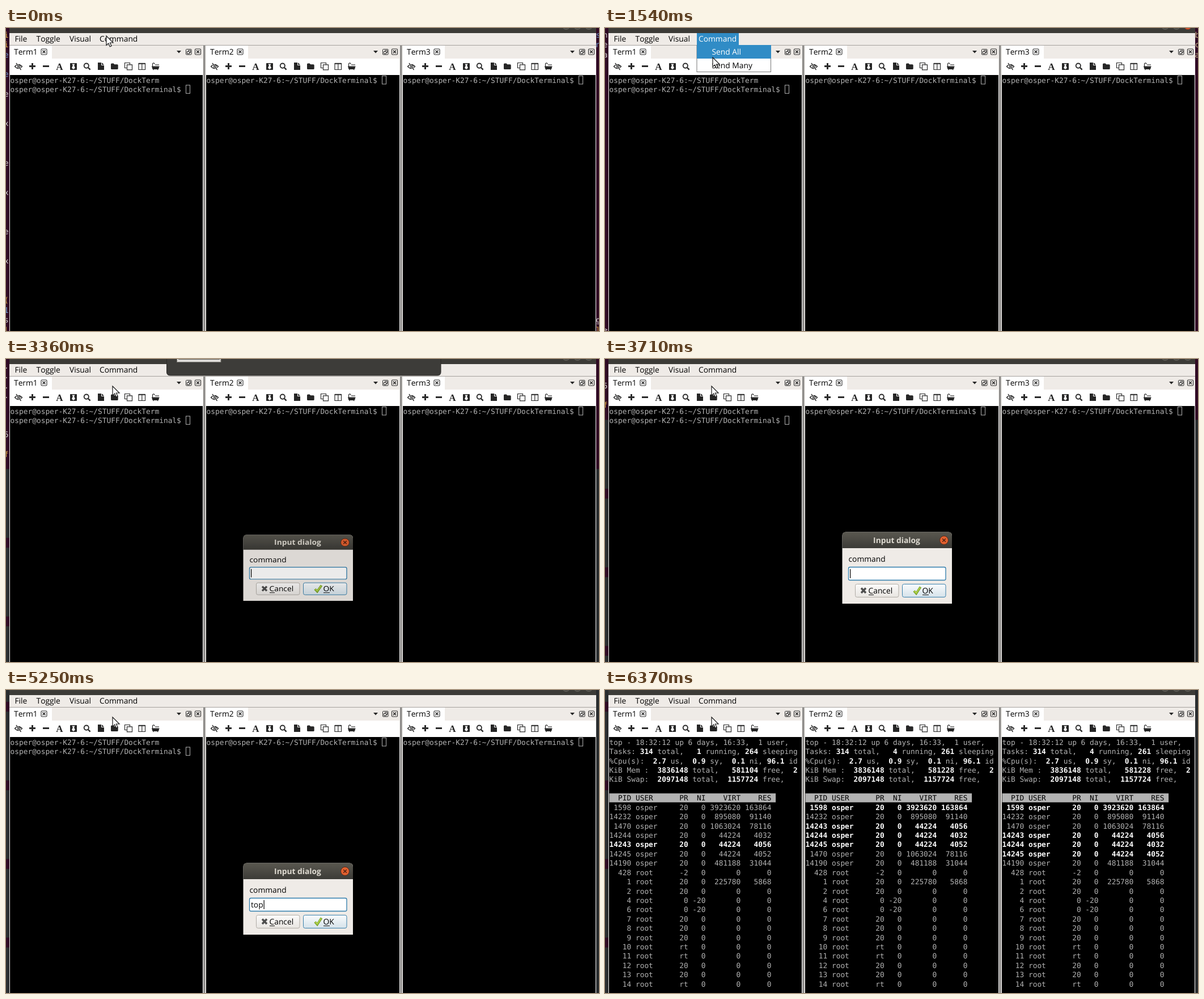
Recreate the animation shown at these times as an HTML page. Size 1046 by 535 pixels, loop 8000 ms.

```html
<!DOCTYPE html>
<html lang="en">
<head>
<meta charset="utf-8">
<title>Dock terminal</title>
<style>
  html, body { margin: 0; width: 100%; height: 100%; overflow: hidden; background: #000; }
  svg { display: block; }
  text { white-space: pre; text-rendering: geometricPrecision; }
  .ui { font: 13.8px "Open Sans", "Noto Sans", sans-serif; font-kerning: none; fill: #000; }
  .mono { font: 12.83px "DejaVu Sans Mono", monospace; fill: #b2b2b2; }
  .mono .b { font-weight: bold; fill: #fff; }
  .side { font: 13.6px "DejaVu Sans Mono", monospace; }
  .line { fill: none; stroke: #2b2b2b; }
</style>
</head>
<body>
<svg id="stage" width="1046" height="535" viewBox="0 0 1046 535"></svg>
<script>
const LOOP = 8000, STEP = 70, LINE = 17.35;
const USER = 'osper', HOST = 'osper-K27-6';
const COL = 7.724, ROW = 16.42;
const PANEL = '#efebe7', ACCENT = '#308cc6';
const docks = [7, 353, 700];

const rect = (x, y, w, h, fill, more = '') =>
  `<rect x="${x}" y="${y}" width="${w}" height="${h}" fill="${fill}" ${more}/>`;
const path = (d, more = '') => `<path d="${d}" ${more}/>`;
const text = (x, y, s, cls = 'ui', more = '') =>
  `<text x="${x}" y="${y}" class="${cls}" ${more}>${s}</text>`;
const group = (id, body) => `<g id="${id}">${body}</g>`;
const rowY = i => 96.8 + i * ROW;

// Text peeking out beside the window: [line, glyphs, colour]
const WHITE = '#d0cfcc', BLUE = '#6d97cb', GOLD = '#d9a441';
const leftText = [
  [0, 'ii', GOLD], [2, 'e e', BLUE], [6, 'e', WHITE], [9, 'x', WHITE], [13, 'e', WHITE],
  [16, 'x', WHITE], [20, 'e', WHITE], [23, 'x', WHITE], [27, '(', GOLD], [28, '1', BLUE],
  [29, 's', WHITE], [30, 'lili', GOLD], [34, 'c', WHITE], [37, 'nenea', WHITE],
  [69, '&gt;', WHITE], [71, '.....', WHITE], [79, '5', WHITE], [81, 'f', GOLD]
];
const rightText = [
  [0, 'sn', BLUE], [29, 'g', WHITE], [30, 'l', GOLD], [32, '-l', GOLD],
  [36, 'nfbbca', '#c9b48a']
];

function sideText(list, x) {
  return list.map(([line, s, colour]) =>
    s.match(/&gt;|./g).map((c, i) =>
      text(x, 17 + (line + i) * LINE, c, 'side', `fill="${colour}"`)).join('')).join('');
}

function backdrop() {
  const end = 12 + 82.5 * LINE;
  let s = rect(0, -600, 1046, end + 600, '#300a24');
  for (let n = 90; n < 124; n += 8) s += rect(0, 3.5 + n * LINE, 6, LINE, '#300a24');
  return s + sideText(leftText, -3.4) + sideText(rightText, 1040.6);
}

function closeBox(x, y) {
  return rect(x - 5, y - 5, 10, 10, 'none', 'class="line" rx="1.5" stroke-width="1.1"') +
    path(`M${x - 2.5} ${y - 2.5}l5 5m0-5l-5 5`, 'class="line" stroke-width="1.6"');
}

function icons() {
  const dark = 'fill="#262626"';
  return path('M-6.5 0Q0-7 6.5 0Q0 7-6.5 0Z', 'class="line" stroke-width="1.3" transform="translate(22 68)"') +
    `<circle cx="22.5" cy="67.5" r="2.3" class="line" stroke-width="1.4"/>` +
    path('M18 62l8.5 12', 'stroke="#fff" stroke-width="3"') +
    path('M18 62l8.5 12', 'class="line" stroke-width="1.4"') +
    path('M41 67.5h11M46.5 62v11M65 67.5h11', 'class="line" stroke-width="3"') +
    `<text x="94.5" y="73.6" text-anchor="middle" font-family="Liberation Serif, serif" font-weight="bold" font-size="17" ${dark}>A</text>` +
    rect(113, 62, 12, 12, '#262626', 'rx=".8"') +
    path('M116.5 63.5h5l-1.4 2.5 1.8 4.5-2.9 2.5-2.9-2.5 1.8-4.5z', 'fill="#fff"') +
    `<circle cx="141.8" cy="66.6" r="4.1" class="line" stroke-width="1.9"/>` +
    path('M145 70l3.6 3.7', 'class="line" stroke-width="2.5"') +
    path('M162 61h6v5h5v8h-11zM169 61l4 4h-4z', dark) +
    path('M185 64q0-1.5 1.5-1.5h3.2l1.5 1.8h5q1.5 0 1.5 1.5v5.7q0 1.5-1.5 1.5h-9.7q-1.5 0-1.5-1.5z', dark) +
    path('M213.5 70.5h-4v-9h9v3M213.5 64.8h9v9h-9z', 'class="line" stroke-width="1.2"') +
    path('M234 62.5h11.5v11h-11.5zM239.8 62.5v11', 'class="line" stroke-width="1.2"') +
    path('M234 62.8h11.5', 'class="line" stroke-width="2"') +
    path('M258.5 68v-4.2q0-2 1.8-2t1.8 2', 'class="line" stroke-width="1.2"') +
    path('M257 67.5h13.5v1.3h-.7v2q0 1.5-1.5 2v1.5h-1.3v-1.2h-6.5v1.2h-1.3v-1.5q-1.5-.5-1.5-2v-2h-.7z', dark) +
    path('M263 65h7', 'class="line" stroke-width="1.1"');
}

function dock(x, i) {
  const w = i ? 341 : 340;
  const end = x + w;
  return rect(x, 31, w, 23, PANEL) + rect(x, 31, 74, 24, '#fff') +
    rect(x, 54, w, 29, '#fff') + rect(x, 83, w, 452, '#000') +
    text(x + 7, 47, 'Term' + (i + 1)) + closeBox(x + 60, 42) +
    path(`M${end - 46} 40h8l-4 4.5z`, 'fill="#262626"') +
    rect(end - 29.5, 37.5, 9.5, 9.5, 'none', 'class="line" rx="1"') +
    path(`M${end - 25.5} 41.5v-2h4v4h-2M${end - 27.5} 41.5h4v4h-4z`, 'class="line"') +
    closeBox(end - 8.5, 42) +
    `<g transform="translate(${x - 7} 0)">${icons()}</g>`;
}

const bold = s => s.replace(/\*(.+?)\*/g, '<tspan class="b">$1</tspan>');

function prompt(x, i) {
  const head = `${USER}@${HOST}:~/STUFF/`;
  const row = i ? 0 : 1;
  return (i ? '' : text(x + .6, rowY(0), head + 'DockTerm', 'mono')) +
    text(x + .6, rowY(row), head + 'DockTerminal$ ', 'mono') +
    rect(x + 310.5, 84.5 + row * ROW, 7, 14.5, 'none', 'stroke="#b2b2b2"');
}

const mine = {
  1598: [3923620, 163864], 14232: [895080, 91140], 1470: [1063024, 78116],
  14243: [44224, 4056], 14244: [44224, 4032], 14245: [44224, 4052], 14190: [481188, 31044]
};
const order = [
  '1598 14232 1470 14244 14243* 14245 14190',
  '1598* 14232 14243* 14244* 14245* 1470 14190',
  '1598* 14232 1470 14243* 14244* 14245* 14190'
];
const rootJobs = '428:-2 1:20 2:20 4:0 6:0 7:20 8:20 9:20 10:rt 11:rt 12:20 13:20 14:rt';

function process(pid, user, pr, ni, virt, res) {
  const right = (v, n) => String(v).padStart(n);
  return right(pid, 5) + ' ' + user.padEnd(9) + right(pr, 3) + right(ni, 4) + right(virt, 8) + right(res, 7);
}

function topLines(i) {
  const [run, sleep, free] = i ? [4, 261, 581228] : [1, 264, 581104];
  const lines = [
    'top - 18:32:12 up 6 days, 16:33,  1 user,',
    `Tasks: *314* total,   *${run}* running, *${sleep}* sleeping`,
    '%Cpu(s):  *2.7* us,  *0.9* sy,  *0.1* ni, *96.1* id',
    `KiB Mem :  *3836148* total,   *${free}* free,  *2*`,
    'KiB Swap:  *2097148* total,  *1157724* free,',
    '', ''
  ];
  for (const item of order[i].split(' ')) {
    const pid = item.replace('*', '');
    const s = process(pid, USER, 20, 0, ...mine[pid]);
    lines.push(item === pid ? s : `*${s}*`);
  }
  for (const item of rootJobs.split(' ')) {
    const [pid, pr] = item.split(':');
    lines.push(process(pid, 'root', pr, pr === '0' ? -20 : 0, ...(pid === '1' ? [225780, 5868] : [0, 0])));
  }
  return lines;
}

function topView(x, i) {
  return topLines(i).map((s, n) => text(x + .6, rowY(n), bold(s), 'mono')).join('') +
    rect(x + .6, rowY(6) - 12.8, 38 * COL, ROW - .6, '#b2b2b2') +
    text(x + .6, rowY(6), '  PID USER      PR  NI    VIRT    RES ', 'mono', 'style="fill:#000"');
}

function frame() {
  let s = rect(6, 0, 1035, 9, '#3c3b37');
  for (const x of [988, 1008, 1028])
    s += `<circle cx="${x}" cy="-4" r="6.5" fill="#4b4a45" stroke="#66645e"/>`;
  s += group('hot', '<circle cx="1028" cy="-4" r="6.5" fill="#d9532c" stroke="#8c3a22"/>');
  s += rect(6, 9, 1035, 526, '#f2f0ed') + rect(6, 9, 1035, 21, PANEL) + rect(6, 30, 1035, 1, '#a5a29e');
  s += rect(348, 31, 3.5, 504, '#8d8b89') + rect(695, 31, 3.5, 504, '#8d8b89');
  s += docks.map(dock).join('');
  return s + text(15.5, 24, 'File') + text(53.5, 24, 'Toggle') + text(112, 24, 'Visual') + text(165, 24, 'Command');
}

const menu = () =>
  rect(162, 9, 74, 21, ACCENT) + text(165, 24, 'Command', 'ui', 'style="fill:#fff"') +
  rect(162, 30.5, 130.5, 47, '#fff', 'stroke="#777"') + rect(162, 30, 131, 24, ACCENT) +
  text(188.5, 47, 'Send All', 'ui', 'style="fill:#fff"') + text(188.5, 71, 'Send Many');

const button = (x, fill, edge) =>
  rect(x + .5, 397.5, 76.5, 23, fill, `rx="3" stroke="${edge}"`);

function dialog() {
  const shape = (bottom, fill) =>
    path(`M418.5 ${bottom}V312q0-6.5 6.5-6.5h180.5q6.5 0 6.5 6.5V${bottom}z`, `fill="${fill}"`);
  return shape(432, PANEL) + shape(334, 'url(#bar)') +
    text(514.5, 325, 'Input dialog', 'ui', 'text-anchor="middle" style="font-weight:bold;fill:#dfdbd2"') +
    '<circle cx="598" cy="320" r="7.5" fill="#e2602f" stroke="#5a2a19"/>' +
    path('M595.2 317.2l5.6 5.6m0-5.6l-5.6 5.6', 'stroke="#4a1f12" stroke-width="1.4"') +
    text(429.5, 358, 'command') +
    rect(429.5, 367.5, 171.5, 23, '#fff', 'rx="2.5" stroke="#2f7cab" stroke-width="1.3"') +
    text(432, 384, '', 'ui', 'id="typed"') + rect(432, 371, 1.2, 16, '#000', 'id="caret"') +
    button(441, 'url(#plain)', '#b0aca6') + button(524, 'url(#blue)', '#3a80ab') +
    path('M452 404.5l8 8.5m0-8.5l-8 8.5', 'stroke="#4d4d4d" stroke-width="3.4"') +
    text(464.5, 414, 'Cancel') + rect(465, 416, 9, 1, '#000') +
    path('M545 409.5l4 4.5 7.5-11.5', 'fill="none" stroke="#6f9a1f" stroke-width="4"') +
    path('M545.5 409.7l3.5 3.6 7-10.3', 'fill="none" stroke="#b4d44c" stroke-width="2"') +
    text(559.5, 414, 'OK') + rect(560, 416, 11, 1, '#000');
}

const shade = (id, a, b) =>
  `<linearGradient id="${id}" x2="0" y2="1"><stop stop-color="${a}"/><stop offset="1" stop-color="${b}"/></linearGradient>`;

document.getElementById('stage').innerHTML =
  `<defs>${shade('bar', '#5a5850', '#3c3b37')}${shade('plain', '#fcfbfa', '#e8e5e1')}${shade('blue', '#fafcfd', '#d5e2ea')}</defs>` +
  rect(0, 0, 1046, 535, '#2a2d2f') + group('back', backdrop()) + frame() +
  docks.map((x, i) => group('prompt' + i, prompt(x, i)) + group('top' + i, topView(x, i))).join('') +
  rect(347, 83, 1, 452, '#fff') + rect(694, 83, 1, 452, '#fff') + rect(1040, 83, 1, 452, '#fff') +
  group('menu', menu()) +
  group('panel', path('M283.5-5V23q0 6 6 6h471.5q6 0 6-6V-5z', 'fill="#3d3c39" stroke="#2c2b29"') +
    rect(301.5, -5, 77.5, 10.5, '#dddbd8', 'stroke="#77756f"') + rect(304, -5, 73, 6, '#55534e')) +
  group('dialog', dialog()) +
  group('pointer', path('M0 0V16.5L3.8 13 6.3 19 9 17.8 6.5 12H12z', 'fill="#fff" stroke="#1a1a1a" stroke-width="1.2"'));

const el = id => document.getElementById(id);
const show = (id, on) => el(id).setAttribute('visibility', on ? 'visible' : 'hidden');

const scroll = [[0, 0], [70, 0], [210, 5], [350, 5], [840, 23], [2380, 58],
  [3360, 72], [4410, 87], [4620, 88], [5250, 89]];
const pointerX = [[0, 177], [70, 177], [210, 185], [350, 185], [560, 190], [2590, 190], [2730, 188]];
const pointerY = [[0, 14], [70, 14], [210, 16], [420, 18], [700, 52], [2100, 52], [2240, 48]];
// Dialog pose: [time, vertical scale, opacity]
const poses = [[0, 1, 0], [3290, .82, .5], [3360, .92, .92], [3430, 1, 1], [6090, .92, .7], [6160, .82, .3], [6230, 1, 0]];
const caretX = [432, 437.5, 446, 454.5];

function along(keys, t) {
  const i = keys.findIndex(k => k[0] > t);
  if (i < 0) return keys[keys.length - 1][1];
  const [t0, a] = keys[i - 1], [t1, b] = keys[i];
  return a + (b - a) * (t - t0) / (t1 - t0);
}

function draw(now) {
  const t = Math.floor((now % LOOP) / STEP) * STEP;
  el('back').setAttribute('transform', `translate(0 ${-Math.round(along(scroll, t)) * LINE})`);
  el('pointer').setAttribute('transform', `translate(${along(pointerX, t)} ${along(pointerY, t)})`);
  show('menu', t >= 420 && t < 3150);
  show('hot', t >= 420 && t < 3290);
  show('panel', t >= 3290 && t < 3570);

  const [, scale, alpha] = poses.filter(p => p[0] <= t).pop();
  el('dialog').setAttribute('transform', `translate(0 ${368.5 * (1 - scale)}) scale(1 ${scale})`);
  el('dialog').setAttribute('opacity', alpha);
  const typed = [4830, 5040, 5180].filter(k => k <= t).length;
  el('typed').textContent = 'top'.slice(0, typed);
  el('caret').setAttribute('x', caretX[typed]);

  docks.forEach((_, i) => {
    const on = t >= 6230 + i * STEP;
    show('top' + i, on);
    show('prompt' + i, !on);
  });
}

const start = performance.now();
function tick() {
  draw(performance.now() - start);
  requestAnimationFrame(tick);
}
tick();
</script>
</body>
</html>
```
